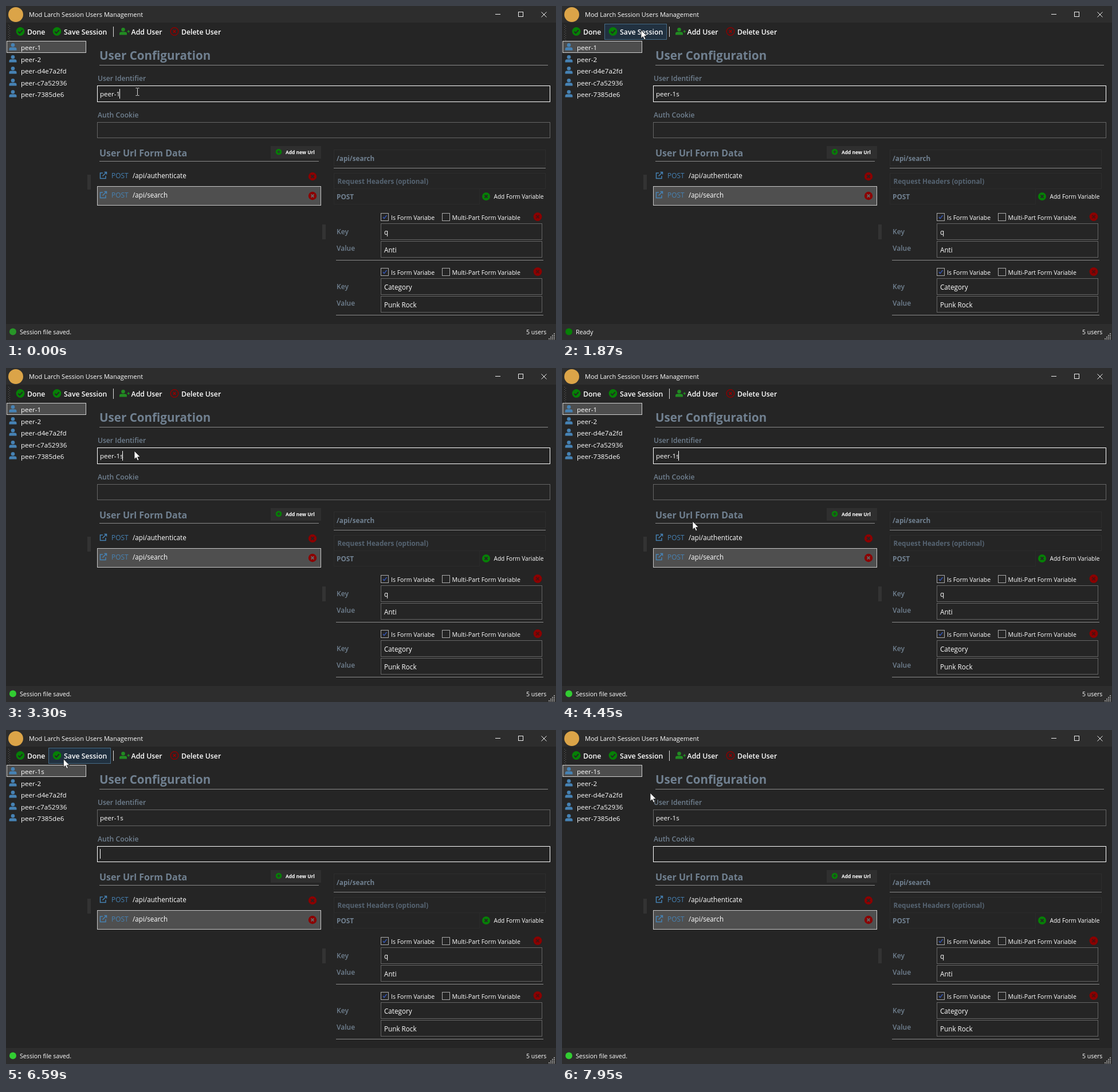
An HTML page with a canvas for the animation above (8 s loop, 960 px wide and 584 px high).

```html
<!DOCTYPE html>
<html lang="en">
<head>
<meta charset="utf-8">
<title>Session Users</title>
<style>
  html, body { margin: 0; height: 100%; overflow: hidden; background: #252525; }
  canvas { display: block; }
</style>
</head>
<body>
<canvas id="stage" width="960" height="584"></canvas>
<script>
const ctx = document.getElementById('stage').getContext('2d');
const LOOP = 8000;
const SLATE = '#708090', STEEL = '#4682b4', GREEN = '#068006', RED = '#8b0000', WHITE = '#fff', BG = '#252525';
const userNames = ['peer-1', 'peer-2', 'peer-d4e7a2fd', 'peer-c7a52936', 'peer-7385de6'];

// Pointer waypoints: time, x, y
const path = [
  [730, 190, 143], [1100, 80, 95], [1300, 60, 72], [1480, 62, 70], [1550, 75, 62],
  [1750, 130, 44], [1870, 138, 42], [2280, 138, 42], [2600, 70, 68], [3040, 58, 72],
  [3110, 75, 78], [3300, 224, 145], [4060, 224, 145], [4450, 228, 268], [4640, 228, 262],
  [4810, 216, 216], [4880, 209, 207], [5610, 209, 207], [5820, 78, 100], [6000, 60, 76],
  [6380, 62, 66], [6450, 75, 62], [6700, 120, 42], [7000, 166, 40], [7310, 166, 40],
  [7330, 183, 38], [7400, 183, 38], [7500, 215, 42], [7680, 80, 64], [7780, 42, 72],
  [7880, 142, 78], [7950, 154, 110]
];
// Times at which the text caret toggles, starting visible
const blinks = [130, 200, 730, 1300, 1830, 2400, 2970, 3250, 3720, 4290, 4810, 4950, 5610, 6180, 6750, 7330, 7900];

function text(str, x, y, size, color = WHITE, weight = 400) {
  ctx.font = `${weight} ${size}px "Open Sans", "Noto Sans", sans-serif`;
  ctx.fillStyle = color;
  ctx.fillText(str, x, y);
}

function fill(x, y, w, h, color) {
  ctx.fillStyle = color;
  ctx.fillRect(x, y, w, h);
}

function box(x, y, w, h, border, background) {
  if (background) fill(x, y, w, h, background);
  ctx.strokeStyle = border;
  ctx.lineWidth = 1;
  ctx.strokeRect(x + .5, y + .5, w - 1, h - 1);
}

function disc(x, y, r, color) {
  ctx.fillStyle = color;
  ctx.beginPath();
  ctx.arc(x, y, r, 0, 7);
  ctx.fill();
}

function stroke(d, x, y, color, width = 1) {
  ctx.save();
  ctx.translate(x, y);
  ctx.strokeStyle = color;
  ctx.lineWidth = width;
  ctx.stroke(new Path2D(d));
  ctx.restore();
}

function shape(d, x, y, color) {
  ctx.save();
  ctx.translate(x, y);
  ctx.fillStyle = color;
  ctx.fill(new Path2D(d));
  ctx.restore();
}

const CROSS = 'M-2.5-2.5L2.5 2.5M2.5-2.5L-2.5 2.5';

function badge(x, y, r, color, mark, markColor = BG, width = 1.8) {
  disc(x, y, r, color);
  stroke(mark, x, y, markColor, width);
}

function person(x, y, color) {
  disc(x, y - 3.2, 3.3, color);
  shape('M-6.5 6V4Q-6.5 .8-3 .8H3Q6.5 .8 6.5 4V6Z', x, y, color);
}

function pointerAt(t) {
  if (t >= path.at(-1)[0]) return path.at(-1).slice(1);
  const i = path.findIndex(p => p[0] > t);
  const [t0, x0, y0] = path[i - 1], [t1, x1, y1] = path[i];
  const k = (t - t0) / (t1 - t0);
  return [x0 + (x1 - x0) * k, y0 + (y1 - y0) * k];
}

function pointer(t) {
  if (t < 165) return { kind: 'beam', x: 229, y: 150 };
  if (t < 730) return { kind: 'none', x: -99, y: -99 };
  if (t >= 3600 && t < 4060) return { kind: 'beam', x: 229, y: 150 };
  if (t >= 4850 && t < 5210) return { kind: 'beam', x: 222, y: 213 };
  const [x, y] = pointerAt(t);
  return { kind: 'arrow', x, y };
}

function drawPointer({ kind, x, y }) {
  if (kind === 'beam') {
    stroke('M-3-6.5H-1L0-6L1-6.5H3M0-6V6M-3 6.5H-1L0 6L1 6.5H3', Math.round(x) + .5, y, '#d8d8d8');
  } else if (kind === 'arrow') {
    const arrow = 'M0 0V14.5L3.3 11.5L5.6 16.8L8 15.8L5.7 10.6H10.3Z';
    shape(arrow, x, y, WHITE);
    stroke(arrow, x, y, '#111', .8);
  }
}

function titleBar() {
  fill(0, 0, 960, 29, '#2d2d2d');
  disc(17, 15, 13, '#dba448');
  text('Mod Larch Session Users Management', 40, 19, 11);
  stroke('M854 14.5H863M934.5 10.5L943.5 19.5M943.5 10.5L934.5 19.5', 0, 0, '#eee');
  box(894, 10, 9, 9, '#eee');
}

function toolbar(mouse) {
  for (let y = 33; y < 58; y += 4) { fill(4, y, 1, 1, '#666'); fill(6, y + 2, 1, 1, '#666'); }
  const hover = (x, w) => {
    if (mouse.y >= 30 && mouse.y < 59 && mouse.x >= x && mouse.x <= x + w) box(x, 31, w, 28, '#466b86', '#213140');
  };
  hover(11, 62);
  hover(74, 109);
  hover(190, 89);
  const check = 'M-3.6 .2L-1 2.9L3.8-2.4';
  badge(25, 44.5, 7.4, GREEN, check, BG, 2);
  text('Done', 37, 49.5, 12.3, WHITE, 600);
  badge(89, 44.5, 7.4, GREEN, check, BG, 2);
  text('Save Session', 101, 49.5, 12.3, WHITE, 600);
  fill(187, 36, 1, 18, '#ddd');
  person(204.5, 44.5, '#228b22');
  stroke('M211.5 44.5H216M213.75 42.2V46.8', 0, 0, '#228b22', 1.5);
  text('Add User', 218.5, 49.5, 12.3, WHITE, 600);
  ctx.beginPath();
  ctx.arc(294, 44.5, 6.8, 0, 7);
  ctx.strokeStyle = RED;
  ctx.lineWidth = 1.5;
  ctx.stroke();
  stroke(CROSS, 294, 44.5, RED, 1.8);
  text('Delete User', 306, 49.5, 12.3, WHITE, 600);
}

function userList(t, mouse) {
  userNames.forEach((name, i) => {
    const y = 61 + Math.round(i * 20.5);
    const hovered = mouse.x >= 1 && mouse.x < 140 && mouse.y >= y && mouse.y < y + 20.5;
    if (i === 0) box(1, y, 139, 21, '#d0d0d0', '#4d4d4d');
    else if (hovered) box(1, y, 139, 21, '#31586f', '#26343d');
    person(12, y + 10.5, STEEL);
    text(i === 0 && t >= 4880 ? name + 's' : name, 26, y + 15.5, 11.6);
  });
}

function userForm(t) {
  const onCookie = t >= 4880;
  const identifier = t < 190 ? 'peer-1' : 'peer-1s';
  text('User Configuration', 163, 93.5, 20.6, SLATE, 700);
  fill(163, 103, 783, 1, '#8a8a8a');
  text('User Identifier', 160, 131, 12.1, SLATE, 600);
  box(159, 139, 791, 29, onCookie ? '#666' : WHITE);
  text(identifier, 164, 158, 11.6);
  const caretX = onCookie ? 164 : Math.floor(163.2 + ctx.measureText(identifier).width);
  text('Auth Cookie', 160, 194.5, 12.2, SLATE, 600);
  box(159, 203, 791, 28, onCookie ? WHITE : '#666');
  if (blinks.filter(b => b <= t).length % 2 === 0) fill(caretX, onCookie ? 208 : 145, 1, 17, WHITE);
}

function urlList() {
  text('User Url Form Data', 163, 262.5, 16, SLATE, 700);
  fill(163, 271, 383, 1, '#8a8a8a');
  fill(462, 245, 88, 22, '#2f2f2f');
  badge(476, 255, 5.3, GREEN, 'M-2.7 0H2.7M0-2.7V2.7', '#2f2f2f', 1.4);
  text('Add new Url', 488, 259, 8.4, WHITE, 700);
  box(159, 315, 391, 34, '#c8c8c8', '#4f4f4f');
  ['/api/authenticate', '/api/search'].forEach((url, i) => {
    const y = 296 + i * 34;
    stroke('M-1-4H-5.5V5.5H4V1M-1.5 1.5L5.5-5.5M1.5-5.5H5.5V-1.5', 170, y, STEEL, 1.5);
    text('POST', 184, y + 4.5, 11.9, STEEL);
    text(url, 221, y + 4.5, 11.7);
    badge(535, y + 2, 7.2, RED, CROSS, i ? '#666' : BG);
  });
  fill(142, 295, 6, 26, '#333');
  fill(552, 382, 6, 26, '#333');
}

function variable(y, key, value) {
  box(654, y + 1, 14, 14, '#aaa');
  stroke('M-3 0L-1 2.6L3.5-3', 661, y + 8, '#3455b5', 1.5);
  text('Is Form Variabe', 672, y + 13, 10.5);
  box(761, y + 1, 14, 14, '#aaa');
  text('Multi-Part Form Variable', 778.5, y + 13, 10.5);
  badge(928, y + 7.5, 7.4, RED, CROSS, '#4a1010');
  text('Key', 577, y + 38, 12.1, SLATE, 600);
  box(654, y + 19, 282, 29, '#666');
  text(key, 660, y + 39, 11.7);
  text('Value', 577, y + 67, 12, SLATE, 600);
  box(654, y + 50, 282, 29, '#666');
  text(value, 660, y + 69.5, 11.7);
  fill(576, y + 83, 362, 1, '#8a8a8a');
}

function requestPanel() {
  box(572, 251, 370, 29, '#2d2d2d');
  text('/api/search', 577, 271, 11.7, SLATE, 700);
  fill(572, 283, 370, 1, '#8a8a8a');
  box(572, 292, 370, 28, '#2d2d2d');
  text('Request Headers (optional)', 578.5, 311, 11.7, '#566472', 700);
  box(572, 319, 255, 28, '#2b2b2b');
  text('POST', 577, 338, 11.8, SLATE, 700);
  badge(838, 333, 7, GREEN, CROSS);
  text('Add Form Variable', 851.5, 337, 10.1);
  variable(361, 'q', 'Anti');
  variable(457, 'Category', 'Punk Rock');
}

function statusBar(t) {
  const ready = t >= 1800 && t < 2010;
  fill(0, 556, 960, 28, '#2d2d2d');
  disc(12, 569.5, 6, ready ? GREEN : t < 1800 ? '#289628' : '#32cd32');
  text(ready ? 'Ready' : 'Session file saved.', 24, 573.5, 10.7);
  text('5 users', 908, 573.5, 10.5);
  for (let r = 0; r < 4; r++)
    for (let c = 0; c <= r; c++) fill(956 - c * 3, 572 + r * 3, 2, 2, '#999');
}

function draw(t) {
  const mouse = pointer(t);
  fill(0, 0, 960, 584, BG);
  titleBar();
  toolbar(mouse);
  userList(t, mouse);
  userForm(t);
  urlList();
  requestPanel();
  statusBar(t);
  drawPointer(mouse);
}

const start = performance.now();
function tick() {
  draw((performance.now() - start) % LOOP);
  requestAnimationFrame(tick);
}
tick();
</script>
</body>
</html>
```
